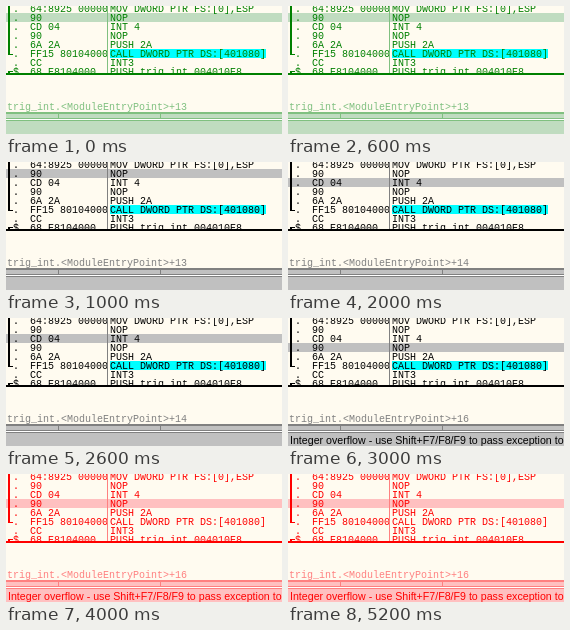
Animation, 276 px wide and 128 px high, one loop 6000 ms. Source, as an HTML page:

```html
<!DOCTYPE html>
<html lang="en">
<head>
<meta charset="utf-8">
<title>Debugger stepping</title>
<style>
  html, body { margin: 0; width: 100%; height: 100%; overflow: hidden; }
  svg { display: block; width: 100vw; height: 100vh; }
  text { white-space: pre; }
  .mono { font: 10px "Liberation Mono", monospace; }
  .status { font: 10.65px "Liberation Sans", sans-serif; }
  .paper { fill: #fffbf0; }
  .face { fill: var(--face); }
  .ink { fill: var(--ink); }
  .mute { fill: var(--mute); }
  .light { fill: #ffffff; }
  .call { fill: var(--call); }
</style>
</head>
<body>
<svg id="stage" viewBox="0 0 276 128" xmlns="http://www.w3.org/2000/svg">
  <defs>
    <clipPath id="code"><rect width="276" height="67"/></clipPath>
    <clipPath id="hex"><rect width="101" height="67"/></clipPath>
  </defs>
</svg>
<script>
const ROW = 9, TOP = -2;
const rows = [
  ["64:8925 00000000", "MOV DWORD PTR FS:[0],ESP"],
  ["90", "NOP"],
  ["CD 04", "INT 4"],
  ["90", "NOP"],
  ["6A 2A", "PUSH 2A"],
  ["FF15 80104000", "CALL DWORD PTR DS:[401080]"],
  ["CC", "INT3"],
  ["68 E8104000", "PUSH trig_int.004010E8"]
];
const themes = {
  green: { face: "#c0dcc0", ink: "#008000", mute: "#80c080", call: "#00ffff" },
  plain: { face: "#c0c0c0", ink: "#000000", mute: "#808080", call: "#00ffff" },
  red:   { face: "#ffc0c0", ink: "#ff0000", mute: "#ff8080", call: "#fffbf0" }
};
const steps = [
  { start: 0,    theme: "green", row: 1, offset: 13 },
  { start: 1000, theme: "plain", row: 1, offset: 13 },
  { start: 2000, theme: "plain", row: 2, offset: 14 },
  { start: 3000, theme: "plain", row: 3, offset: 16, fault: true },
  { start: 4000, theme: "red",   row: 3, offset: 16, fault: true }
];
const LOOP = 6000;
const stage = document.getElementById("stage");

function add(parent, tag, attrs, content = "") {
  const node = document.createElementNS("http://www.w3.org/2000/svg", tag);
  for (const key in attrs) node.setAttribute(key, attrs[key]);
  node.textContent = content;
  return parent.appendChild(node);
}
const box = (parent, cls, x, y, width, height) =>
  add(parent, "rect", { class: cls, x, y, width, height });
const label = (parent, cls, x, y, content) =>
  add(parent, "text", { class: cls, x, y }, content);

box(stage, "paper", 0, 0, 276, 128);
const code = add(stage, "g", { "clip-path": "url(#code)" });
const selection = box(code, "face", 0, 0, 276, ROW);
box(code, "call", 104, TOP + 5 * ROW, 156, ROW);
const hex = add(code, "g", { "clip-path": "url(#hex)" });
rows.forEach(([bytes, command], i) => {
  const base = TOP + i * ROW + 8;
  label(hex, "mono ink", 24, base, bytes);
  label(code, "mono ink", 104, base, command);
  label(code, "mono ink", 7, base, i < 7 ? "." : "$");
});
box(code, "mute", 101, 0, 1, 67);

// Argument brackets: one closes at the call, the next opens below it
box(code, "ink", 2, 0, 2, 49);
box(code, "ink", 2, 48, 5, 1);
box(code, "ink", 2, 65, 2, 2);
box(code, "ink", 2, 65, 5, 1);

box(stage, "ink", 0, 67, 276, 2);
const info = label(stage, "mono mute", 1, 104, "");

// Pane splitter, dump header and status bar
box(stage, "face", 0, 106, 276, 22);
box(stage, "mute", 0, 106, 276, 2);
for (const x of [52, 154]) box(stage, "mute", x, 108, 1, 4);
box(stage, "mute", 0, 112, 276, 1);
box(stage, "light", 0, 113, 276, 1);
box(stage, "mute", 0, 114, 276, 1);
const status = label(stage, "status ink", 2, 126, "");

let shown;
function render(time) {
  const step = steps.findLast(s => time % LOOP >= s.start);
  if (step === shown) return;
  shown = step;
  for (const [name, color] of Object.entries(themes[step.theme]))
    stage.style.setProperty("--" + name, color);
  selection.setAttribute("y", TOP + step.row * ROW);
  info.textContent = `trig_int.<ModuleEntryPoint>+${step.offset}`;
  status.textContent = step.fault
    ? "Integer overflow - use Shift+F7/F8/F9 to pass exception to program" : "";
}

const origin = performance.now();
function tick() {
  render(performance.now() - origin);
  requestAnimationFrame(tick);
}
tick();
</script>
</body>
</html>
```
